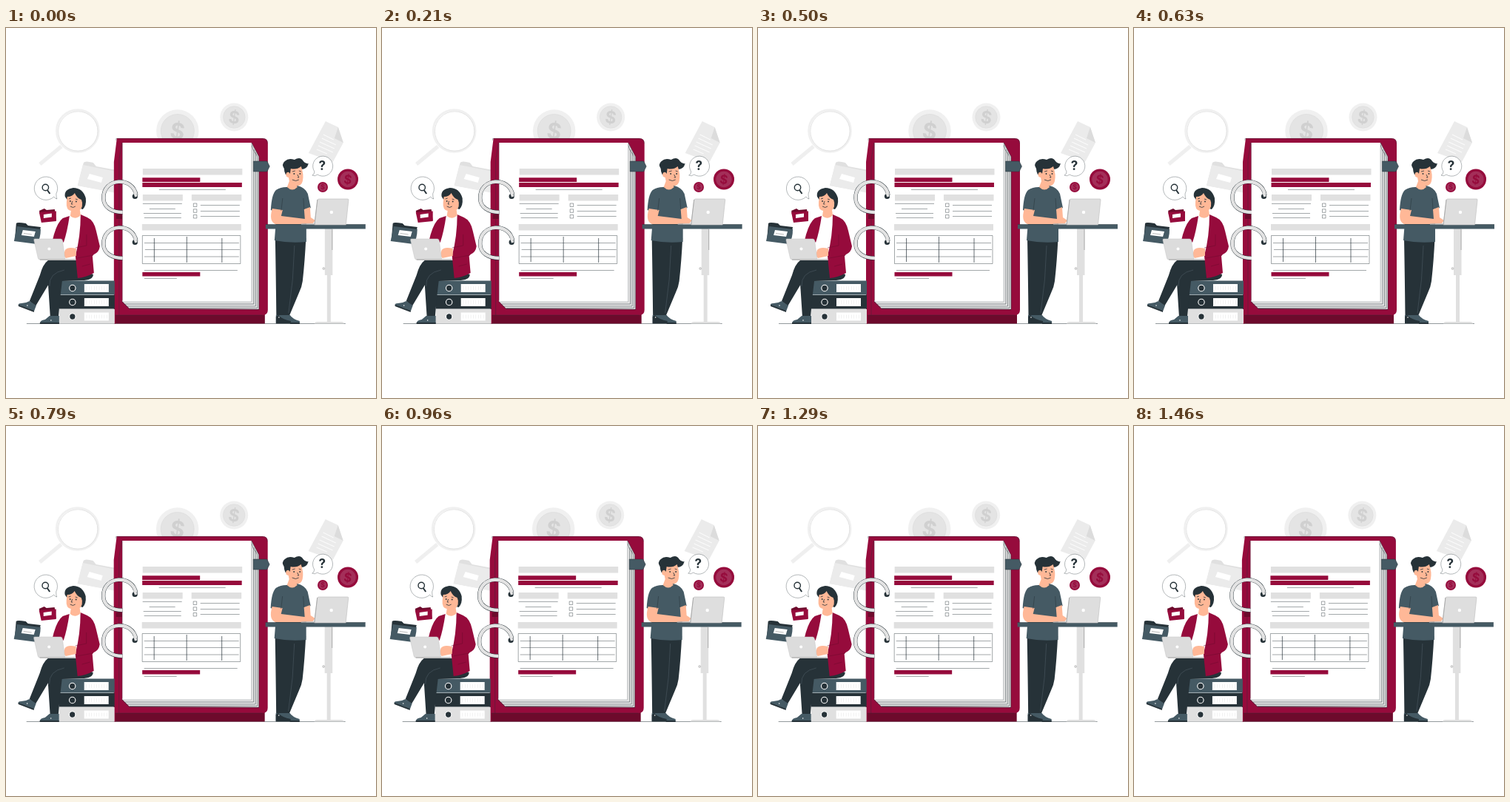
Animation of 500x500 px, one loop 1500 ms. Source, as an HTML page:

```html
<!DOCTYPE html>
<html lang="en">
<head>
<meta charset="utf-8">
<style>
html, body { margin: 0; width: 100%; height: 100%; overflow: hidden; background: #fff }
svg { display: block; width: 100vw; height: 100vh }
text { font-family: Inter, sans-serif; font-weight: 700; text-anchor: middle }
.red { fill: #960b3c } .wine { fill: #6d0a2c } .slate { fill: #455a64 } .dark { fill: #263238 }
.white { fill: #fff } .pale { fill: #ebebeb } .grey { fill: #e0e0e0 } .skin { fill: #ffb897 }
.line { fill: none; stroke: #263238; stroke-width: .5 }
.seam { fill: none; stroke: #53616a; stroke-width: .5 }
.bubble { fill: #fff; stroke: #263238; stroke-width: .35 }
</style>
</head>
<body>
<svg viewBox="0 0 500 500">
<defs>
  <path id="arc" d="M176 226C172 200 131 202 132 230C132 242 143 249 158 249" fill="none"/>
  <g id="ring">
    <use href="#arc" stroke="#263238" stroke-width="5.2"/>
    <use href="#arc" stroke="#e3e3e3" stroke-width="4.4"/>
    <circle class="dark" cx="174.5" cy="227.5" r="3.6"/>
    <path d="M174 222L176 228" stroke="#e3e3e3" stroke-width="3.5"/>
  </g>
  <g id="binder">
    <circle cx="90" cy="351.5" r="4.2" fill="#263238" stroke="#fff" stroke-width="1.1"/>
    <path class="white" d="M106 346h33v11h-33z"/>
    <path d="M109 351.5h28" stroke="#ddd" stroke-width="5" stroke-dasharray=".4 3"/>
  </g>
</defs>

<g id="scene">
  <!-- backdrop -->
  <path d="M75 160L46 184" stroke="#efefef" stroke-width="5"/>
  <circle cx="97" cy="139" r="28.3" fill="#fff" stroke="#f0f0f0" stroke-width="3"/>
  <circle cx="97.5" cy="139.5" r="26.7" fill="none" stroke="#dedede" stroke-width=".8"/>
  <circle cx="232" cy="139" r="28.7" fill="#f0f0f0"/>
  <circle cx="232" cy="139" r="22.5" fill="#e4e4e4" stroke="#d8d8d8" stroke-width=".6"/>
  <text x="232" y="150" font-size="30" fill="#d0d0d0" transform="rotate(8 232 139)">$</text>
  <circle cx="308.5" cy="120.5" r="19" fill="#f0f0f0"/>
  <circle cx="308.5" cy="120.5" r="14.8" fill="#e4e4e4" stroke="#d8d8d8" stroke-width=".5"/>
  <text x="308.5" y="129" font-size="23" fill="#d0d0d0" transform="rotate(8 308.5 121)">$</text>
  <path class="pale" d="M432 126L449 134L456 155L442 181L409 169Z"/>
  <path fill="#dcdcdc" d="M449 134L456 155L444 149Z"/>
  <path d="M429 144l14 7M427 149l19 9M424 154l20 9M422 159l20 9M420 164l14 6" stroke="#fafafa" stroke-width="1.2"/>
  <path class="grey" d="M105 182Q107 179 118 182L122 187L149 192V222L97 213Z"/>
  <path class="pale" d="M104 185L149 194V223L97 213Z"/>
  <path class="white" d="M113 197L131 202L129 209L110 204Z"/>
  <path class="line" d="M28 399.5H459"/>

  <!-- book -->
  <path class="wine" d="M147 386H350V399.5H147Z"/>
  <path class="red" d="M150 149H347Q354 149 354 156V381Q354 388 347 388H148V399.5H146V181Z"/>
  <path class="line" d="M149 152V149.3H347Q353.6 149.5 353.6 156M156.8 155L153 178V388M148 388H347" stroke-opacity=".7"/>
  <path class="wine" d="M149 252h8v6h-8z"/>
  <path d="M332 155L342 174V380L167 379L157 369Z" fill="#e6e6e6"/>
  <path class="line" d="M332 158L335 167V373H161M335 164L337.5 170V376H164M337 168L340 174V378.5H167M332 155L342 174V380.5L167 379.5L157 370"/>
  <path class="white" d="M157.5 155H332V370H157.5Z"/>
  <path class="line" d="M332 155V370H157.5V155" stroke-opacity=".5"/>
  <path class="grey" d="M185 190h134.500v8.500H185zM185 225h54v8.500H185zM251 225h67.500v8.500H251zM184 265h134v8.500H184z"/>
  <path class="red" d="M184.500 202.300H262.500v5.700H184.500zM184.500 209H319v6H184.500zM184.500 330H262.500v5.600H184.500z"/>
  <path class="line" stroke-opacity=".85" d="M207 218.500h90M185 237.500h53M194 244.500h35M186 250.500h51M187 256.500h50M263 239.500h53M263 247.500h53M263 254.500h53M187 327.500h126M187 338.500h44
    M253.500 237h4.500v4.500h-4.500zM253.500 244.800h4.500v4.500h-4.500zM253.500 252.500h4.500v4.500h-4.500z
    M184.500 280.500H317V318.500H184.500zM187 290.500H315M188 299.500H316M187 309H315"/>
  <path class="line" style="stroke-width:.7" d="M200.500 284V316M244.500 282V317M292 284V317"/>
  <path class="slate" d="M334.500 180H353L356.500 187L353 194H334.500Z" stroke="#263238" stroke-width=".5"/>
  <use href="#ring"/><use href="#ring" y="62"/>

  <!-- left bubble and folders -->
  <path class="bubble" d="M65 228Q67 231 69 231Q68 229 68 224A15.700 15.700 0 1 0 65 228Z"/>
  <circle cx="53.5" cy="215.500" r="4.200" fill="none" stroke="#263238" stroke-width="1.400"/>
  <path d="M56 219L59.500 224" stroke="#263238" stroke-width="2"/>
  <path class="dark" d="M14 264Q15 262 27 264L30 267L47 269L43 291L12 287Z"/>
  <path class="slate" d="M15 268L47 272Q47 284 42 292L11 288Q13 278 15 268Z"/>
  <path class="white" d="M23 273L40 275L38 282L21 280Z"/>
  <path d="M24 277.500l11 1.500" stroke="#999" stroke-width=".7"/>
  <path class="wine" d="M45 247L52 244L55 246L66 245L68 260L49 262Z"/>
  <path class="red" d="M45 249L68 247.500V261L48 263Z"/>
  <path class="white" d="M51 252L62 250.500V255.500L51 257Z"/>

  <!-- binders -->
  <path class="slate" d="M75 341.500H147V360.500H73Z"/>
  <path class="dark" d="M72 361H147V379.500H72Z"/>
  <path class="grey" d="M72 380H147V399.500H72Z"/>
  <use href="#binder"/><use href="#binder" y="19"/><use href="#binder" y="38.500"/>

  <!-- seated figure -->
  <path class="dark" d="M118 333Q118 341 102 341L76 342Q73 365 71 391H60L57 345Q56 330 72 326L98 325Z"/>
  <path class="dark" d="M98 314L57 314Q50 319 46 334L32 369L40 376L61 341L106 338Z"/>
  <path d="M59 349Q58 331 79 327" class="seam"/>
  <path class="slate" d="M32 369L41 375L38 383Q28 378 17 375Q16 372 21 372Q27 372 32 369Z"/>
  <path class="slate" d="M59 389H72V399H46Q46 395 53 394Z"/>
  <path class="dark" d="M17 374L38 382V384L17 376ZM46 398H72V400H46Z"/>
  <circle class="white" cx="29" cy="375" r=".8"/><circle class="white" cx="61" cy="395" r=".8"/>
  <path class="white" d="M84 255L103 252L101 304H78Z"/>
  <path class="red" d="M86 254L77 257Q70 262 65 279L63 287H76L78 290Q83 275 86 254Z"/>
  <path class="red" d="M101 252L110 256Q119 260 122 274L127 295Q126 303 119 306L117 308L119 331Q108 337 97 338L94 308Q101 281 101 252Z"/>
  <path class="line" style="stroke:#6d0a2c" d="M109 279L109 294L94 297M118 307L96 311M103 322L114 319"/>
  <path class="skin" d="M95 298Q84 295 80 300Q77 308 81 311L95 308Z"/>
  <path class="dark" d="M80 228Q78 218 91 216Q104 216 108 230Q109 240 104 245L88 240Z"/>
  <path class="skin" d="M83 228Q90 228 93 223Q96 230 102 232Q104 236 103 241Q102 245 100 246L101 253Q94 260 87 254L88 247Q81 246 82 235Z"/>
  <path class="line" style="stroke-width:.8" d="M85 231l3-1M94 231l3 1M87 241q4 3 7 0M90 234l-1.500 4h2"/>
  <circle class="dark" cx="87" cy="234" r=".9"/><circle class="dark" cx="95" cy="234.500" r=".9"/>
  <path d="M39 285H74Q76 285 76.500 287L80 313H46Q44 313 43.500 311L38 287Q37.500 285 39 285Z" fill="#dcdcdc" stroke="#c4c4c4" stroke-width=".5"/>
  <path d="M46 313H94" stroke="#b5b5b5" stroke-width="1.300"/>
  <circle class="white" cx="58.500" cy="298.500" r="2"/>

  <!-- standing figure -->
  <path class="dark" d="M364 284H405.500Q404 315 401 342Q400 350 396 358L383 389H365.500Q365 340 364 284Z"/>
  <path class="seam" d="M390 294Q389 340 382 385"/>
  <path class="slate" d="M365 388H384Q387 393 397 396V399H365Z"/>
  <path class="dark" d="M365 390L368 388Q374 394 385 396V399.500H365ZM384 398H397V400H384Z"/>
  <circle class="white" cx="369" cy="391" r=".8"/>
  <path class="slate" d="M379 215L394 213Q405 216 408 224L412 243L406 246V289Q383 291 363 287L366 249L358 246Q359 225 365 219Q371 215 379 215Z"/>
  <path class="skin" d="M360 244L374 246L372 254L404 258L403 245L411 242L412 256L418 260L415 264L400 265H364Q355 261 360 244Z"/>
  <path class="line" d="M374 230L372 247M403 245L402 230"/>
  <path class="dark" d="M378 198Q376 194 376 190Q372 184 377 180Q382 175 390 178Q398 173 402 180Q405 184 409 183Q407 191 399 191L386 199Z"/>
  <path class="skin" d="M385 190Q393 192 399 187Q403 198 401 207Q399 214 393 213L394 215Q387 222 380 215L383 207L382 202Q377 201 379 196Q382 193 384 197Z"/>
  <path class="line" style="stroke-width:.8" d="M387 194l4-1M396 193l3 1M387 205q5 3 9 0M394 198l2 4h-2"/>
  <circle class="dark" cx="389.500" cy="197" r=".9"/><circle class="dark" cx="397.500" cy="197" r=".9"/>
  <path class="bubble" d="M417 194Q417 198 414 199Q418 201 421 198A13.500 13.500 0 1 0 417 194Z"/>
  <text class="dark" x="427.500" y="192" font-size="17">?</text>

  <!-- desk -->
  <path class="grey" d="M431 271H441.500V334H431ZM434 334H439V397H434ZM417 399.500Q417 397 421 397H453Q457 397 457 399.500Z"/>
  <path d="M441 272V300" stroke="#aaa" stroke-width="1"/>
  <circle cx="429.500" cy="325" r="1.500" fill="#ddd" stroke="#aaa" stroke-width=".5"/>
  <path class="slate" d="M351 265.500H486V271.500H351Z"/>
  <path class="line" d="M351 265.500H486"/>
  <path d="M423 231H462Q463.500 231 463 233L459.500 266H417L421 233Q421 231 423 231Z" fill="#dedede" stroke="#bdbdbd" stroke-width=".6"/>
  <path d="M421 232L417 266" stroke="#aaa" stroke-width="1"/>
  <path d="M399 265H418" stroke="#b5b5b5" stroke-width="1.300"/>
  <circle class="white" cx="440" cy="249" r="2.200"/>
</g>

<!-- still coins -->
<g class="red">
  <circle cx="462" cy="204.500" r="14"/>
  <circle cx="462" cy="204.500" r="10.700" fill="#a32f59"/>
  <text x="462" y="210.500" font-size="16.500" transform="rotate(8 462 204)">$</text>
  <circle cx="428" cy="215" r="7"/>
  <circle cx="428" cy="215" r="5.300" fill="#a32f59"/>
  <text x="428" y="218.200" font-size="8.500">$</text>
</g>
</svg>
<script>
const scene = document.getElementById('scene');
const offsets = [0, -1, 2, -3, 3, -3, 3, -3, 2, -1, 0];
const STEPS = 36, LOOP = 1500;

function draw(now) {
  const step = Math.floor(now % LOOP / LOOP * STEPS + .1) % STEPS;
  const pos = (step + .6) / STEPS * 10;
  const i = Math.floor(pos);
  const x = offsets[i] + (offsets[i + 1] - offsets[i]) * (pos - i);
  scene.setAttribute('transform', `translate(${x.toFixed(3)} 0)`);
}

const start = performance.now();
function tick() {
  draw(performance.now() - start);
  requestAnimationFrame(tick);
}
tick();
</script>
</body>
</html>
```
